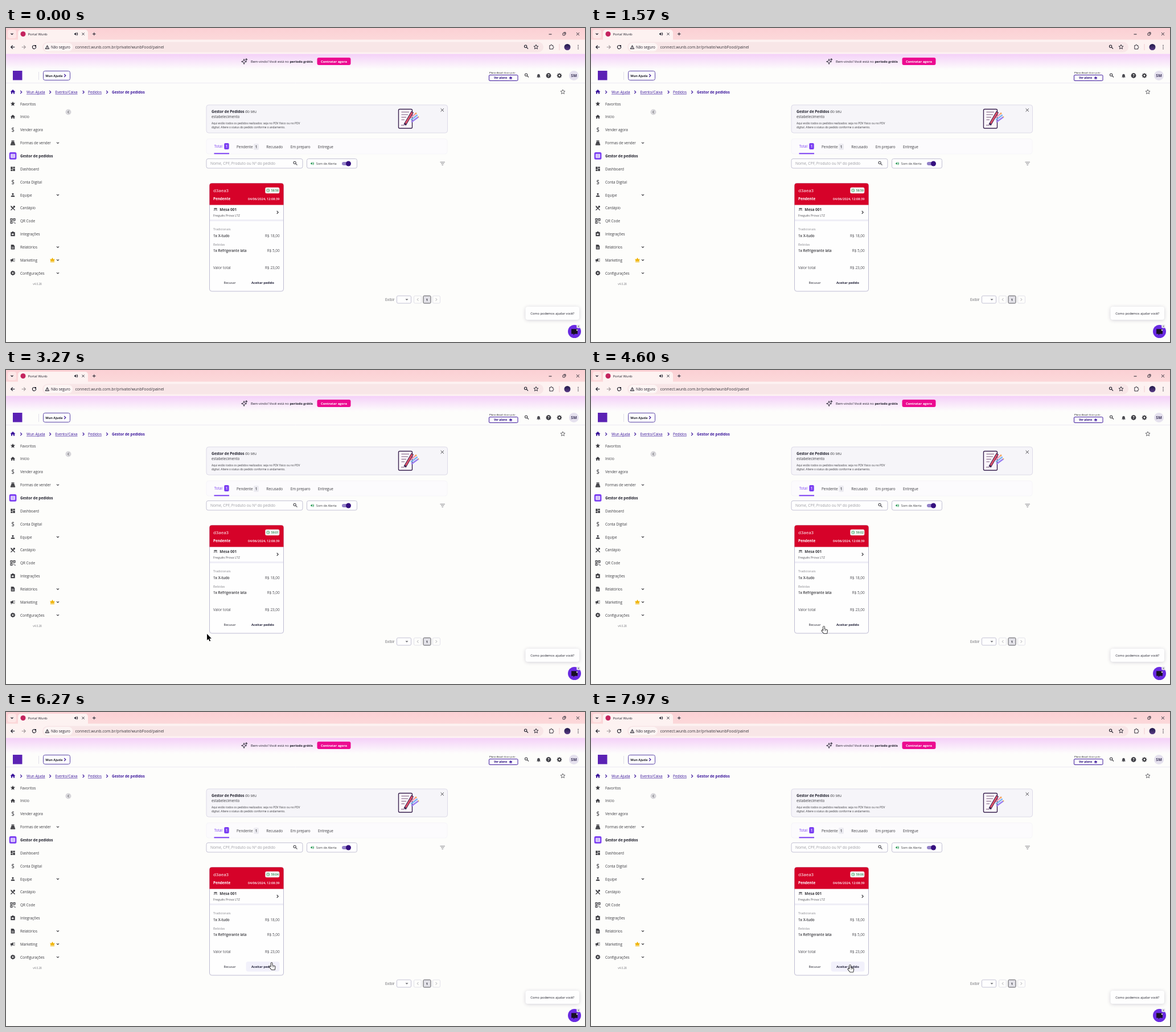
Recreate the animation shown at these times as an HTML page with a canvas. Size 1017 by 551 pixels, loop 8000 ms.

```html
<!DOCTYPE html>
<html lang="pt-BR">
<head>
<meta charset="utf-8">
<title>Gestor de pedidos</title>
<style>
html, body { margin: 0; width: 100%; height: 100%; overflow: hidden; background: #fdfdfb; }
canvas { display: block; width: 1017px; height: 551px; }
</style>
</head>
<body>
<canvas id="stage"></canvas>
<script>
const W = 1017, H = 551, LOOP = 8000;
const canvas = document.getElementById('stage');
const dpr = window.devicePixelRatio || 1;
canvas.width = W * dpr;
canvas.height = H * dpr;
const ctx = canvas.getContext('2d');

const INK = '#3b3b40', DARK = '#1f1f2b', PURPLE = '#7b3ff2', DEEP = '#3c179c', GRAY = '#77777d';

// y is the middle of the capitals
function text(s, x, y, size, color = INK, weight = 400, align = 'left') {
  ctx.font = `${weight} ${size}px "Open Sans", "Noto Sans", sans-serif`;
  ctx.textAlign = align;
  ctx.fillStyle = color;
  ctx.fillText(s, x, y + size * 0.36);
  return x + ctx.measureText(s).width;
}

function box(x, y, w, h, r, fill, stroke, lw = 1) {
  ctx.beginPath();
  ctx.roundRect(x, y, w, h, r);
  if (fill) { ctx.fillStyle = fill; ctx.fill(); }
  if (stroke) { ctx.strokeStyle = stroke; ctx.lineWidth = lw; ctx.stroke(); }
}

function dot(x, y, r, fill, stroke, lw = 1) {
  box(x - r, y - r, 2 * r, 2 * r, r, fill, stroke, lw);
}

function line(color, lw, ...p) {
  ctx.beginPath();
  ctx.moveTo(p[0], p[1]);
  for (let i = 2; i < p.length; i += 2) ctx.lineTo(p[i], p[i + 1]);
  ctx.strokeStyle = color;
  ctx.lineWidth = lw;
  ctx.stroke();
}

function chevron(x, y, dx, dy, color = INK, lw = 1.1) {
  if (dx) line(color, lw, x - dx / 2, y - 2 * Math.abs(dx) / 2, x + dx / 2, y, x - dx / 2, y + Math.abs(dx));
  else line(color, lw, x - dy, y - dy / 2, x, y + dy / 2, x + dy, y - dy / 2);
}

function cross(x, y, r, color = INK, lw = 1) {
  line(color, lw, x - r, y - r, x + r, y + r);
  line(color, lw, x + r, y - r, x - r, y + r);
}

function lens(x, y, s, color = INK, lw = 1.1) {
  dot(x - s * 0.25, y - s * 0.25, s * 0.6, null, color, lw);
  line(color, lw, x + s * 0.2, y + s * 0.2, x + s, y + s);
}

// Icons on a 24 unit grid
const shapes = {
  star: 'M12 17.3 18.2 21 16.5 14 22 9.2 14.8 8.6 12 2 9.2 8.6 2 9.2 7.5 14 5.8 21z',
  home: 'M10 20v-6h4v6h5v-8h3L12 3 2 12h3v8z',
  dash: 'M3 13h8V3H3zM3 21h8v-6H3zM13 21h8V11h-8zM13 3v6h8V3z',
  till: 'M6 2h12v5H6zM3 16 6 8h12l3 8zM2 17h20v5H2z',
  person: 'M12 12a4 4 0 1 0 0-8 4 4 0 0 0 0 8zM4 20v-2c0-5 16-5 16 0v2z',
  bell: 'M10 20h4a2 2 0 0 1-4 0zM4 19v-1l2-2v-5c0-9 12-9 12 0v5l2 2v1z',
  crown: 'M3 19h18v3H3zM2 6l5 4 5-8 5 8 5-4-2 11H4z',
  file: 'M4 2h11l5 6v14H4zM7 11v2h10v-2zM7 16v2h10v-2z',
  horn: 'M2 9h5l7-5v16l-7-5v6H4v-6H2zM17 11h5v2h-5zM16 7l4-3 1 2-4 3zM16 17l4 3 1-2-4-3z',
  speaker: 'M3 9v6h4l5 5V4L7 9zM15 8c4 2 4 6 0 8zM15 3c9 3 9 15 0 18v-2c6-3 6-11 0-14z',
  puzzle: 'M4 6h5c-1-5 6-5 5 0h5v5c4 0 4 6 0 6v5H4z',
  clip: 'M3 4h5c1-4 7-4 8 0h5v17H3zM7 11v4h4v3l6-5-6-5v3z',
  spark: 'M10 3l2.5 7.5L20 13l-7.5 2.5L10 23l-2.500-7.500L0 13l7.500-2.500zM19 1l1 3 3 1-3 1-1 3-1-3-3-1 3-1z',
  table: 'M2 9 5 4h14l3 5zM5 10h2l-2 10H3zM17 10h2l2 10h-2zM7 13h10v2H7z',
  chat: 'M3 4h18v14h-8l-4 4v-4H3z',
  arrow: 'M0 0V17.500L4 13.800 6.800 20 9.500 18.800 6.800 12.800H12.200z',
  hand: 'M5 1.500c0-2 3-2 3 0V8l6 1.200c2 .5 2.300 2 2 3.500L15 19H6.500L1 12.500c-1-1.500.8-3 2.300-1.600L5 12.500z'
};
for (const k in shapes) shapes[k] = new Path2D(shapes[k]);

function icon(name, x, y, size, fill, stroke, lw = 1.6, centred = true) {
  const k = size / 24;
  ctx.save();
  ctx.translate(x - (centred ? size / 2 : 0), y - (centred ? size / 2 : 0));
  ctx.scale(k, k);
  if (stroke) { ctx.strokeStyle = stroke; ctx.lineWidth = lw; ctx.stroke(shapes[name]); }
  if (fill) { ctx.fillStyle = fill; ctx.fill(shapes[name], 'evenodd'); }
  ctx.restore();
}

function gear(x, y, r, color = INK) {
  for (let i = 0; i < 8; i++) {
    const a = i * Math.PI / 4;
    line(color, 1.5, x + Math.cos(a) * r * 0.5, y + Math.sin(a) * r * 0.5, x + Math.cos(a) * r, y + Math.sin(a) * r);
  }
  dot(x, y, r * 0.55, null, color, r * 0.45);
}

function vertical(y0, y1, a, b) {
  const g = ctx.createLinearGradient(0, y0, 0, y1);
  g.addColorStop(0, a);
  g.addColorStop(1, b);
  return g;
}

function browser() {
  box(0, 0, W, 22, 0, vertical(0, 22, '#fbd0d4', '#fcd9da'));
  box(3, 3, 15, 15, 4, '#fde7e7');
  chevron(10.5, 10.5, 0, 2, DARK);
  box(21, 3, 123, 24, 5, '#fdf2f1');
  box(0, 20.5, W, 25, 0, '#fdf2f1');
  dot(30, 10.500, 4.500, '#c4245f');
  text('Portal Wunb', 38.500, 11, 5.900, DARK);
  icon('speaker', 123, 10.500, 8, DARK);
  cross(135.500, 10.500, 2, DARK);
  line(DARK, 1, 152, 10.500, 157.500, 10.500);
  line(DARK, 1, 154.750, 7.800, 154.750, 13.200);
  line(DARK, 1, 953.500, 11, 958.500, 11);
  box(978, 9, 3.800, 3.800, 0.5, null, DARK, 0.9);
  line(DARK, 0.9, 979.500, 7.700, 983, 7.700, 983, 11.300);
  cross(1004.500, 10.500, 2.400, DARK);

  [[12, 1, DARK], [31, -1, '#a39a9c']].forEach(([x, d, c]) => {
    line(c, 1.1, x - 3.300, 33.500, x + 3.300, 33.500);
    line(c, 1.1, x - d * 0.300, 30.500, x - d * 3.300, 33.500, x - d * 0.300, 36.500);
  });
  ctx.beginPath();
  ctx.arc(49.500, 33.500, 3, -0.4, 5.2);
  ctx.strokeStyle = DARK;
  ctx.lineWidth = 1.1;
  ctx.stroke();
  box(50.500, 30, 2.500, 2.500, 0, DARK);
  box(64, 24.500, 880, 18, 9, '#f8e6e7');
  box(66, 26, 51, 15, 7.500, '#fdf5f4');
  line(DARK, 1, 69.300, 36.500, 72.500, 30.500, 75.700, 36.500, 68.900, 36.500);
  line(DARK, 0.8, 72.500, 32.800, 72.500, 35.500);
  text('Não seguro', 79, 33.500, 6.300, DARK);
  text('connect.wunb.com.br/private/wunbFood/painel', 121.500, 33.500, 7, '#36343a');
  lens(913.500, 33, 3.500, DARK);
  icon('star', 931, 33.200, 9.500, null, DARK, 2.300);
  icon('puzzle', 958, 33, 9.500, null, DARK, 2.300);
  line('#f0cdd0', 1, 972, 28, 972, 39);
  dot(986, 33.500, 5.500, vertical(28, 39, '#201a4a', '#5a3b86'));
  for (const y of [30.500, 33.500, 36.500]) dot(1005, y, 0.8, DARK);
}

function header() {
  box(0, 45.500, W, 27, 0, vertical(45.500, 72, '#f4d0f8', '#fdfcfc'));
  icon('spark', 419, 58.500, 11, null, DARK, 1.900);
  const x = text('Bem-vindo! Você está no ', 430, 58.500, 5.830, DARK, 500);
  text('período grátis', x, 58.500, 5.830, DARK, 700);
  box(546.500, 52, 59, 13, 3, '#ec0a90');
  text('Contratar agora', 576, 58.500, 5.750, '#fff', 700, 'center');

  box(12, 75, 16.500, 16.500, 0, '#5b22b4');
  line('#e2e0ea', 1, 57.500, 77, 57.500, 91);
  box(65.500, 75.500, 47, 16, 3, '#fefefe', '#5a44a8');
  text('Wun Ajuda', 69.300, 84, 5.550, DARK, 700);
  chevron(103.500, 83.500, 2.500, 0, DEEP, 1.2);
  const px = text('Plano Atual: ', 849, 78.500, 4.300, INK, 600);
  text('Avançado', px, 78.500, 4.300);
  box(848.500, 82.500, 50.500, 10, 1.500, '#fefefe', DEEP);
  text('Ver plano', 857, 87.500, 4.900, '#2b0f7d', 700);
  icon('crown', 886.500, 87.300, 6, DEEP);
  lens(914.500, 83, 3.500);
  icon('bell', 935.500, 83.700, 9.500, '#4a4a50');
  dot(953, 83.500, 4.400, '#3f3f45');
  text('?', 953, 83.600, 6.500, '#fff', 700, 'center');
  gear(972, 83.500, 4.300);
  dot(997.500, 83.500, 8.500, '#e5e1ee');
  text('SM', 997.500, 83.700, 7, '#3a3358', 700, 'center');
  line('#ebeaf2', 1, 0, 96.500, W, 96.500);
}

function crumbs() {
  icon('home', 12, 112, 10.500, DEEP);
  for (const x of [26.500, 77.500, 136, 177.500]) chevron(x, 112.500, 2.500, 0, DEEP);
  [['Wun Ajuda', 36], ['Evento/Caixa', 86.500], ['Pedidos', 144]].forEach(([s, x]) => {
    const end = text(s, x, 112.500, 6.450, DEEP);
    line(DEEP, 0.6, x, 116.300, end, 116.300);
  });
  text('Gestor de pedidos', 186, 112.500, 6.450, DEEP, 700);
  icon('star', 978, 112, 9.500, null, INK, 1.900);
}

function sidebar() {
  const items = [
    ['Favoritos', 'star'], ['Início', 'home'], ['Vender agora', '$'],
    ['Formas de vender', 'till', 1], ['Gestor de pedidos', 'list'], ['Dashboard', 'dash'],
    ['Conta Digital', '$'], ['Equipe', 'person', 1], ['Cardápio', 'fork'], ['QR Code', 'code'],
    ['Integrações', 'clip'], ['Relatórios', 'file', 1], ['Marketing', 'horn', 1], ['Configurações', 'gear', 1]
  ];
  items.forEach(([label, kind, more], i) => {
    const y = 133 + i * 22.850, x = 12, on = kind === 'list';
    text(label, 25, y + 0.300, 6.400, on ? DARK : INK, on ? 700 : 400);
    if (more) chevron(91, y, 0, 2);
    if (kind === '$') text('$', x, y, 10, INK, 400, 'center');
    else if (kind === 'gear') gear(x, y, 4.300);
    else if (on) {
      box(5.800, y - 6.300, 12.600, 12.600, 2.500, PURPLE);
      box(8.300, y - 3.500, 7.600, 7, 0.8, '#fff');
      for (let k = -1; k < 2; k++) line(PURPLE, 0.7, 9.300, y + k * 2, 15, y + k * 2);
    } else if (kind === 'fork') {
      line(INK, 1.300, 8.500, y + 4, 15, y - 2.500);
      line(INK, 1.300, 8.500, y - 3.500, 15.500, y + 4);
      dot(14.300, y - 2.300, 1.700, INK);
      line(INK, 1.900, 9, y - 2.500, 11, y - 0.500);
    } else if (kind === 'code') {
      for (const [a, b] of [[-4, -4], [1, -4], [-4, 1]]) box(x + a, y + b, 3, 3, 0, null, INK, 1.100);
      box(x + 1, y + 1, 1.500, 1.500, 0, INK);
      box(x + 3, y + 3, 1.500, 1.500, 0, INK);
    } else icon(kind, x, y, 9.800, INK);
  });
  icon('crown', 81.500, 407, 9.500, '#f0b400');
  text('v4.0.28', 55, 449, 4.700, GRAY, 400, 'center');
  dot(109.500, 147.500, 5, '#d7d6da');
  line(INK, 0.9, 110.500, 145.500, 108.500, 147.500, 110.500, 149.500);
}

function intro() {
  box(352, 135, 423.500, 49, 4, '#f6f5f9', '#dcdae8');
  const x = text('Gestor de Pedidos', 361, 147, 6.400, DARK, 700);
  text(' do seu', x, 147, 6.400);
  text('estabelecimento', 361, 156, 6.400);
  text('Aqui estão todos os pedidos realizados: seja no PDV físico ou no PDV', 361, 167.500, 4.870);
  text('digital. Altere o status do pedido conforme o andamento.', 361, 174, 4.870);
  cross(766.300, 144, 2.700, INK, 0.9);

  box(689.500, 142.500, 24, 33.500, 2, '#fbf6fb', '#3a2350', 1.400);
  [[147.500, 708], [152, 706], [156.500, 703], [161, 700]].forEach(([y, e]) => line('#6b4a70', 0.9, 694.500, y, e, y));
  line('#6b4a70', 0.9, 694, 170.500, 700, 170.500);
  [['#f59ab5', 0], ['#7db4f0', 3.500], ['#9a7df0', 7]].forEach(([c, d]) => line(c, 2.400, 710 + d * 0.3, 158 + d, 721 + d * 0.5, 149 + d));
  line('#3a2350', 4.600, 700.500, 170, 714, 147);
  line('#e0526a', 2.800, 702, 167.500, 713.500, 148);
  icon('star', 720, 150, 4.500, '#f6b63c');
  icon('star', 724.500, 156, 3.500, '#f6b63c');
}

function filters() {
  box(352, 194.500, 423, 26.500, 4, '#fcfbfd', '#f6f5f9');
  text('Total', 365.700, 207.800, 6.400, PURPLE);
  box(383.200, 202, 8.500, 11, 2, PURPLE);
  text('1', 387.450, 207.800, 6.400, '#fff', 600, 'center');
  box(365.500, 219.300, 26.500, 2, 0, PURPLE);
  text('Pendente', 405, 208.700, 6.400);
  box(435, 203, 9, 11, 2, '#ecebf1');
  text('1', 439.500, 208.700, 6.400, INK, 600, 'center');
  text('Recusado', 457.300, 208.700, 6.400);
  text('Em preparo', 499.700, 208.700, 6.400);
  text('Entregue', 548, 208.700, 6.400);

  box(352, 229.500, 169, 16.500, 3, '#fefefe', '#c3c1d4');
  text('Nome, CPF, Produto ou Nº do pedido', 359, 238, 6.650, '#9b9ba2');
  lens(508, 237.200, 3.500, '#4a4a50');
  box(528.500, 229.500, 88, 16.500, 3, '#fefefe', '#c3c1d4');
  icon('speaker', 538, 237.800, 7.500, '#2c9a58');
  text('Som de Alerta', 544.700, 238, 5.500);
  box(590, 235, 14.500, 6, 3, '#9381c8');
  dot(601.500, 238, 4.500, '#35107f');
  [[762.500, 771], [764, 769.500], [765.500, 768]].forEach(([a, b], i) => line('#7a7a80', 0.9, a, 235.300 + i * 2.500, b, 235.300 + i * 2.500));
}

function order(seconds, hover) {
  box(357.500, 272.500, 130, 189.500, 4, '#fefefe', '#bdbbd2');
  box(357.500, 272.500, 130, 38, [4, 4, 0, 0], '#d60229');
  text('d3aea3', 364, 285.500, 7.900, '#fff');
  text('Pendente', 364, 299.500, 6.300, '#fff', 700);
  text('04/06/2024, 12:08:39', 480.500, 299.500, 5.650, '#fff', 600, 'right');
  box(455.300, 279.800, 25, 10.500, 2.500, '#f4fbf5');
  dot(460.300, 285, 2.500, null, '#2c9a58', 0.8);
  line('#2c9a58', 0.7, 460.300, 283.500, 460.300, 285.200, 461.500, 285.800);
  const clock = `${Math.floor(seconds / 60)}:${String(seconds % 60).padStart(2, '0')}`;
  text(clock, 478.800, 285.200, 5.100, '#2f7d4f', 600, 'right');

  icon('table', 368, 318.500, 7.500, INK);
  text('Mesa 001', 375.300, 318.800, 6.500, INK, 700);
  text('Freguês Prova LTZ', 364, 329.500, 5.550, '#55555b');
  chevron(477, 323.500, 2.500, 0);
  box(358, 336, 129, 3, 0, '#efeef6');

  text('Tradicionais', 364, 353.500, 5.500, '#88888e');
  text('1x X-tudo', 364, 365, 6.250, INK, 600);
  text('Bebidas', 364, 380, 5.500, '#88888e');
  text('1x Refrigerante lata', 364, 391, 6.200, INK, 600);
  text('Valor total', 364, 420.500, 6.450, '#4d4d53');
  [['18,00', 365], ['5,00', 391], ['23,00', 420.500]].forEach(([v, y]) => text('R$ ' + v, 480.700, y, 6.450, '#4d4d53', 400, 'right'));

  if (hover > 0) {
    ctx.globalAlpha = hover;
    box(421.500, 438, 59, 17.500, 4, '#f2f1fb');
    ctx.globalAlpha = 1;
  }
  text('Recusar', 393, 447, 5.500, '#55555f', 600, 'center');
  text('Aceitar pedido', 451, 447, 5.500, '#22223a', 700, 'center');
}

function footer() {
  text('Exibir', 666, 476.800, 6.400, '#66666c');
  box(686.500, 470, 25, 13, 2, '#fefefe', '#c3c1d4');
  ctx.beginPath();
  ctx.moveTo(701.500, 475.500);
  ctx.lineTo(706.500, 475.500);
  ctx.lineTo(704, 478);
  ctx.fillStyle = '#66666c';
  ctx.fill();
  box(716.500, 470, 13, 13, 2, null, '#e2e1ea');
  box(733, 470, 13, 13, 1.500, '#e3e2e8', '#55555b');
  box(749.500, 470, 13, 13, 2, null, '#e2e1ea');
  line('#9b9ba2', 0.9, 724.300, 474.300, 722.300, 476.500, 724.300, 478.700);
  line('#9b9ba2', 0.9, 754.800, 474.300, 756.800, 476.500, 754.800, 478.700);
  text('1', 739.500, 476.700, 5.800, DARK, 700, 'center');

  ctx.save();
  ctx.shadowColor = 'rgba(60,50,90,.22)';
  ctx.shadowBlur = 6 * dpr;
  ctx.shadowOffsetY = dpr;
  box(912.500, 489, 94.500, 23, 4, '#fefefe');
  ctx.restore();
  text('Como podemos ajudar você?', 959.700, 500.500, 5.700, DARK, 400, 'center');
  dot(998.500, 532.500, 11.500, '#6a2be2');
  icon('chat', 998.500, 533, 14.500, '#171024');
  icon('star', 1003, 530, 4, '#fff');
  box(1002.300, 520, 6.500, 6.500, 1.500, '#eeedf3');
  text('x', 1005.500, 522.700, 6, INK, 400, 'center');
}

// Pointer tip: time, x, y
const route = [
  [1900, 1022, 372], [2130, 803, 405], [2530, 600, 440], [2830, 309, 476], [3030, 345, 470],
  [3170, 345, 470], [3270, 353, 463], [3970, 400, 456], [4370, 407, 450], [4600, 407, 450],
  [4830, 396, 468], [5330, 396, 468], [6130, 462, 443], [6270, 464.500, 440],
  [6800, 464.500, 440], [7270, 441, 468], [7530, 441, 468], [7970, 453, 444]
];

function pointer(t) {
  if (t < route[0][0]) return;
  let i = route.findIndex(p => p[0] > t);
  if (i < 0) i = route.length - 1;
  const [t0, x0, y0] = route[i - 1], [t1, x1, y1] = route[i];
  const k = Math.min(1, (t - t0) / (t1 - t0));
  const x = x0 + (x1 - x0) * k, y = y0 + (y1 - y0) * k;
  const overButton = (t > 4000 && t < 4700) || t > 5600;
  if (overButton) {
    icon('hand', x - 2, y, 15, '#fff', '#111', 2.800, false);
    for (const d of [4.300, 6.200]) line('#111', 0.6, x + d - 0.500, y + 5.800, x + d - 0.500, y + 7.800);
  } else icon('arrow', x, y, 15.500, '#000', '#fff', 1.600, false);
}

function draw(now) {
  const t = now % LOOP;
  ctx.setTransform(dpr, 0, 0, dpr, 0, 0);
  box(0, 0, W, H, 0, '#fdfdfb');
  browser();
  header();
  crumbs();
  sidebar();
  intro();
  filters();
  order(58 * 60 + 58 + Math.floor((t + 200) / 1000), Math.max(0, Math.min(1, (t - 5980) / 250)));
  footer();
  pointer(t);
}

const start = performance.now();
function tick() {
  draw(performance.now() - start);
  requestAnimationFrame(tick);
}
tick();
</script>
</body>
</html>
```
